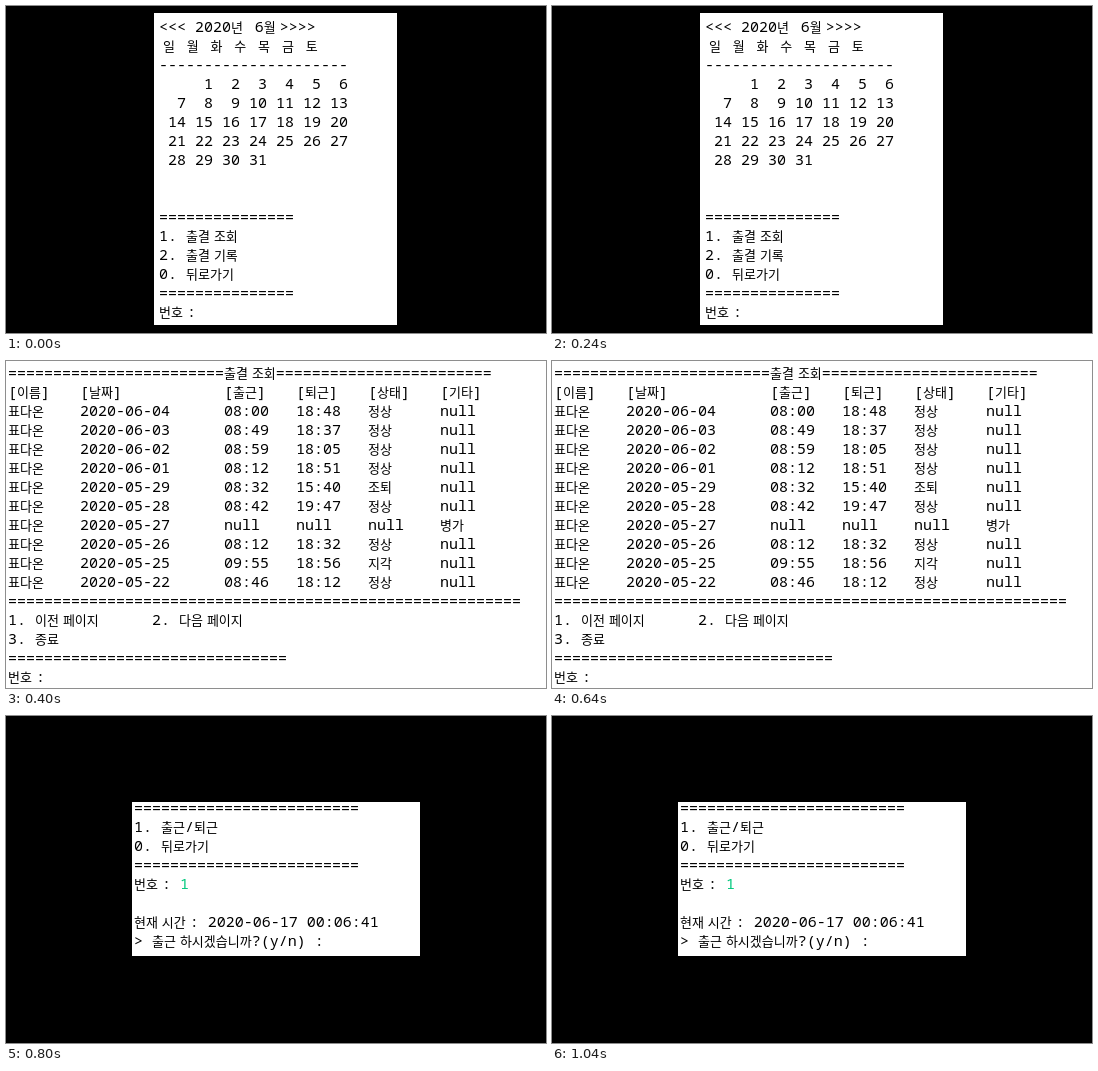
Recreate the animation shown at these times as an HTML page. Size 540 by 327 pixels, loop 1.2 s.

```html
<!DOCTYPE html>
<html lang="ko">
<head>
<meta charset="utf-8">
<title>출결 콘솔</title>
<style>
  html, body { margin: 0; width: 100%; height: 100%; overflow: hidden; background: #000; }
  .console { position: absolute; overflow: hidden; background: #fff; visibility: hidden; }
  pre {
    position: absolute; margin: 0; color: #000; tab-size: 8;
    font: 500 15px/19px "Noto Sans Mono", monospace;
    font-variant-ligatures: none;
  }
  .ko { font: 13px/0 "Noto Sans CJK KR", "Noto Sans CJK", sans-serif; word-spacing: .3px; }
  .input { color: #00c87d; }
</style>
</head>
<body>
<script>
const STEP = 400;
const rule = (length, mark = '=') => mark.repeat(length);

function calendar() {
  const cells = Array.from({ length: 32 }, (_, day) => String(day || '').padStart(3));
  const weeks = [];
  for (let i = 0; i < cells.length; i += 7) weeks.push(cells.slice(i, i + 7).join(''));
  return weeks;
}

const menu = [
  '<<< 2020년   6월 >>>>',
  '',
  rule(21, '-'),
  ...calendar(),
  '', '',
  rule(15),
  '1. 출결 조회',
  '2. 출결 기록',
  '0. 뒤로가기',
  rule(15),
  '번호 :'
];

// date, arrival, departure, status, note
const records = [
  ['06-04', '08:00', '18:48', '정상'],
  ['06-03', '08:49', '18:37', '정상'],
  ['06-02', '08:59', '18:05', '정상'],
  ['06-01', '08:12', '18:51', '정상'],
  ['05-29', '08:32', '15:40', '조퇴'],
  ['05-28', '08:42', '19:47', '정상'],
  ['05-27', 'null', 'null', 'null', '병가'],
  ['05-26', '08:12', '18:32', '정상'],
  ['05-25', '09:55', '18:56', '지각'],
  ['05-22', '08:46', '18:12', '정상']
].map(([date, arrive, leave, status, note = 'null']) =>
  ['표다온', '2020-' + date, arrive, leave, status, note].join('\t'));

const attendance = [
  rule(24) + '출결 조회' + rule(24),
  '[이름]\t[날짜]\t\t[출근]\t[퇴근]\t[상태]\t[기타]',
  ...records,
  rule(57),
  '1. 이전 페이지\t2. 다음 페이지',
  '3. 종료',
  rule(31),
  '번호 :'
];

const checkIn = [
  rule(25),
  '1. 출근/퇴근',
  '0. 뒤로가기',
  rule(25),
  '번호 : {1}',
  '',
  '현재 시간 : 2020-06-17 00:06:41',
  '> 출근 하시겠습니까?(y/n) :'
];

const escapeHtml = text => text.replace(/</g, '&lt;').replace(/>/g, '&gt;');

// Spaces that follow Hangul belong to the narrower Hangul run.
const markup = lines => escapeHtml(lines.join('\n'))
  .replace(/[가-힣][가-힣 ]*/g, '<span class="ko">$&</span>')
  .replace(/{(.+?)}/g, '<span class="input">$1</span>');

function addConsole(left, top, width, height) {
  const box = document.createElement('div');
  box.className = 'console';
  box.style.cssText = `left:${left}px;top:${top}px;width:${width}px;height:${height}px`;
  document.body.append(box);
  return box;
}

function addText(box, x, y, lines) {
  const pre = document.createElement('pre');
  pre.style.left = x + 'px';
  pre.style.top = y + 'px';
  pre.innerHTML = markup(lines);
  box.append(pre);
}

const menuBox = addConsole(148, 7, 243, 312);
addText(menuBox, 5, 4, menu);
addText(menuBox, 9, 23, ['일   월   화   수   목   금   토']);

const attendanceBox = addConsole(0, 0, 540, 327);
addText(attendanceBox, 2, 2, attendance);

const checkInBox = addConsole(126, 86, 288, 154);
addText(checkInBox, 2, -4, checkIn);

const screens = [menuBox, attendanceBox, checkInBox];

function draw() {
  const current = Math.floor(performance.now() / STEP) % screens.length;
  screens.forEach((box, i) => { box.style.visibility = i === current ? 'visible' : 'hidden'; });
  requestAnimationFrame(draw);
}
draw();
</script>
</body>
</html>
```
